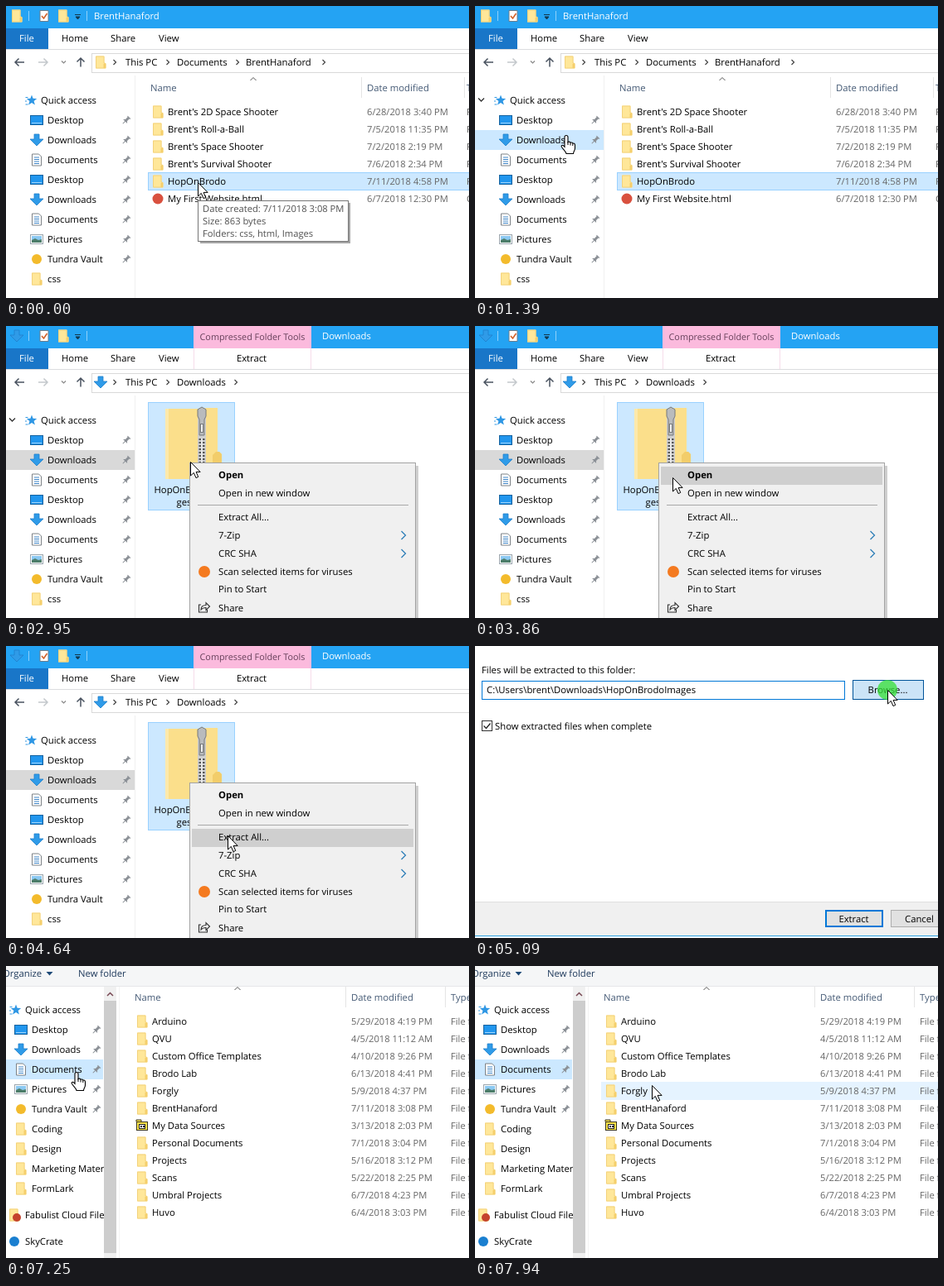
These frames come from a looping animation (558x353 px, 8000 ms). An HTML page:

```html
<!DOCTYPE html>
<html lang="en">
<head>
<meta charset="utf-8">
<title>Extracting a zip file</title>
<style>
  html, body { margin: 0; width: 100%; height: 100%; overflow: hidden; background: #fff; }
  svg { display: block; }
  text { font: 11.3px "Open Sans", "Noto Sans", sans-serif; fill: #000; text-rendering: geometricPrecision; white-space: pre; }
  .dim { fill: #656565; font-size: 11.2px; }
  .tip { fill: #505050; font-size: 11.2px; }
  .white { fill: #fff; }
  .head { fill: #455a75; }
  .tool { fill: #1e395b; }
  .tab { fill: #66405a; font-size: 10.8px; text-anchor: middle; }
  .mid { text-anchor: middle; }
  .bold { font-weight: 700; }
</style>
</head>
<body>
<svg id="stage" width="558" height="353" viewBox="0 0 558 353"></svg>
<script>
const LOOP = 8000;
const BLUE = '#24a3f3', SELECT = '#cce8ff', HOVER = '#e5f3ff', EDGE = '#99d1ff';

// Drawing helpers
const rect = (x, y, w, h, fill, stroke, sw = 1) => stroke
  ? `<rect x="${x + sw / 2}" y="${y + sw / 2}" width="${w - sw}" height="${h - sw}" fill="${fill}" stroke="${stroke}" stroke-width="${sw}"/>`
  : `<rect x="${x}" y="${y}" width="${w}" height="${h}" fill="${fill}"/>`;
const text = (x, y, s, cls = '') => `<text x="${x}" y="${y}" class="${cls}">${s}</text>`;
const path = (d, fill, stroke = 'none', sw = 1) =>
  `<path d="${d}" fill="${fill}" stroke="${stroke}" stroke-width="${sw}"/>`;
const at = (x, y, body) => `<g transform="translate(${x} ${y})">${body}</g>`;
const group = (id, body) => `<g id="${id}">${body}</g>`;
const bar = (id, fill = HOVER) => `<rect id="${id}" fill="${fill}"/>`;
const dot = (r, fill) => `<circle r="${r}" fill="${fill}"/>`;
const chevron = (x, y) => path(`M${x - 1.5} ${y - 3}l3 3-3 3`, 'none', '#444', 1.2);
const sortMark = (x, y) => path(`M${x - 3.5} ${y + 2}l3.5-3.5 3.5 3.5`, 'none', '#555');

// Icons, centred on 0,0
const folder = path('M-6-7.5h10.5v8l2 1v6h-12.5z', '#ffe799') +
  path('M-5.500-7h9.500v8l2 .5v5.500h-11.500z', 'none', '#f3d27c') + path('M3.500 7v-5l2.500-.5v5.500z', '#f5cf6c');
const icon = {
  folder,
  arrow: path('M-3-7h6v6h5l-8 8-8-8h5z', '#2f9be8', '#1f7fcb', .8),
  desktop: rect(-8, -6, 16, 12, '#2196ee', '#14629f') + rect(-6, 3, 12, 1, '#9fd4fa'),
  doc: path('M-5.5-7h8l3 3v11h-11z', '#fff', '#7d8286') + path('M-3-3h6M-3-.5h6M-3 2h6M-3 4.5h6', 'none', '#3f86c8'),
  pic: rect(-8, -6, 16, 12, '#fff', '#9aa5ad') + rect(-6, -4, 12, 8, '#8cc9f2') + path('M-6 4v-3l4-2 4 2 4-1v4z', '#4c7d6a'),
  star: path('M1-6.500l1.600 4.300 4.600.2-3.600 2.900 1.300 4.600-3.900-2.500-3.900 2.500 1.300-4.600-3.600-2.900 4.600-.2z', '#2f97e4') +
    path('M-6.500-3.500h3M-7 1h2M-6.500 5h3', 'none', '#2f97e4'),
  drive: dot(6, '#f3bb2c'),
  browser: dot(6.5, '#d9513f'),
  cloud: dot(6, '#1a7fd0'),
  art: folder + `<circle cx="3" cy="3" r="5" fill="#c4422c"/>`,
  source: rect(-7, -5, 14, 11, '#f7e24a', '#3a3620') + path('M-7-5v-2h6v2', '#f7e24a', '#3a3620') +
    rect(-4, -2, 8, 6, '#fff', '#222') + rect(-2, 0, 2, 2, '#222') + rect(1, 0, 2, 2, '#222'),
  pin: `<g transform="rotate(45)">${path('M-2.5-5h5v1h-1v4l2 2h-7l2-2v-4h-1zM-.5 2h1v4h-1z', '#8b9096')}</g>`
};
const put = (name, x, y) => at(x, y, icon[name]);

const navItems = (items, x, y, pinX) => items.map(([kind, label, pinned], i) =>
  put(kind, x, y + 24 * i) + text(x + 13, y + 4 + 24 * i, label) +
  (pinned ? put('pin', pinX, y + 24 * i) : '')).join('');

const fileRows = (rows, x, y, dateX, typeX) => rows.map(([name, date, kind = 'folder'], i) => {
  const cy = y + 21 * i;
  return (kind === 'source' ? group('sourceIcon', put(kind, x, cy)) : put(kind, x, cy)) +
    text(x + 12, cy + 4, name) + text(dateX, cy + 4, date, 'dim') +
    text(typeX, cy + 4, kind === 'browser' ? 'Code file' : 'File folder', 'dim');
}).join('');

const places = [
  ['desktop', 'Desktop', 1], ['arrow', 'Downloads', 1], ['doc', 'Documents', 1]
];
const extras = [['pic', 'Pictures', 1], ['drive', 'Tundra Vault', 1]];

// Explorer window
const frame =
  rect(0, 0, 558, 27, BLUE) + rect(27, 6, 1, 12, '#8fd0fa') +
  at(46, 12, path('M-5-6.5h10v13h-10z', '#fff', '#6d7d8a') + path('M-3 0l2.5 3 4-6', 'none', '#d2622a', 1.6)) +
  put('folder', 69, 12) + path('M83 10.500h7M84 13h5l-2.500 3z', '#12384f', '#12384f') +
  rect(97, 6, 1, 12, '#8fd0fa') +
  rect(0, 27, 51, 25, '#1976c8') + text(16, 43, 'File', 'white') +
  text(67, 43, 'Home') + text(126, 43, 'Share') + text(184, 43, 'View') +
  rect(0, 52, 558, 1, '#dcdddf') +
  path('M22 68H11M15.500 63.500L11 68l4.500 4.500', 'none', '#4a5360', 1.5) +
  path('M39 68h11M45.500 63.500L50 68l-4.500 4.500', 'none', '#c4c8cc', 1.5) +
  path('M67 66.500l2.500 2.500 2.500-2.500', 'none', '#888', 1.2) +
  path('M90 73.500V63M85.500 67.500L90 63l4.500 4.500', 'none', '#4a5360', 1.5) +
  rect(103, 57, 470, 24, '#fff', '#d9d9d9') + chevron(131, 68) + text(144, 72, 'This PC') + chevron(195, 68) +
  rect(155, 84, 1, 269, '#f0f0f0');

const nav = bar('navHover') + `<rect id="navSel" x="0" y="150" width="155" height="24"/>` +
  `<path id="twist" d="M4 111.500l3.500 3.500 3.500-3.500" fill="none" stroke="#333" stroke-width="1.300"/>` +
  put('star', 30, 114) + text(42, 118, 'Quick access') +
  navItems([...places, ...places, ...extras, ['folder', 'css']], 37, 138, 145);

const home = put('folder', 13, 12) + text(106, 16, 'BrentHanaford', 'white') +
  put('folder', 114, 68) + text(206, 72, 'Documents') + chevron(279, 68) +
  text(289, 72, 'BrentHanaford') + chevron(383, 68) +
  sortMark(298, 88) + text(174, 103, 'Name', 'head') + text(435, 103, 'Date modified', 'head') + text(555, 103, 'Type', 'head') +
  rect(428, 86, 1, 25, '#e5e5e5') + rect(552, 86, 1, 25, '#e5e5e5') +
  bar('rowHover') + rect(171, 201, 400, 22, SELECT, EDGE) +
  fileRows([
    ["Brent's 2D Space Shooter", '6/28/2018 3:40 PM'], ["Brent's Roll-a-Ball", '7/5/2018 11:35 PM'],
    ["Brent's Space Shooter", '7/2/2018 2:19 PM'], ["Brent's Survival Shooter", '7/6/2018 2:34 PM'],
    ['HopOnBrodo', '7/11/2018 4:58 PM'], ['My First Website.html', '6/7/2018 12:30 PM', 'browser']
  ], 183, 128, 435, 555);

const tip = rect(234, 238, 181, 49, '#00000059') + rect(231, 235, 182, 50, '#fff', '#767676') +
  ['Date created: 7/11/2018 3:08 PM', 'Size: 863 bytes', 'Folders: css, html, Images']
    .map((s, i) => text(237, 249 + 15 * i, s, 'tip')).join('');

const zip = path('M192 100h46l3-1h14v53h2l3 3v30h-68z', '#fbdf8b') + path('M192 100h4v85h-4z', '#fde9ab') +
  path('M249 156l4-4h4l3 3v30h-11z', '#f2cd6a') +
  rect(231, 104, 10, 81, '#cfcfcf') +
  `<path d="M236 136v49" stroke="#555" stroke-width="7" stroke-dasharray="2 2"/>` +
  `<path d="M236 136v49" stroke="#e8e8e8" stroke-width="2"/>` +
  path('M231 101l5-3 5 3v8l-2 4v19h-6v-19l-2-4z', '#b9bbbd', '#77797b') + rect(234, 118, 4, 11, '#f1f1f1', '#77797b');

const downloads = put('arrow', 13, 12) + put('arrow', 114, 68) + text(206, 72, 'Downloads') + chevron(277, 68) +
  group('plainTitle', text(106, 16, 'Downloads', 'white')) +
  group('toolTab', rect(226, 0, 142, 27, '#fbbadd') + rect(226, 27, 1, 25, '#f6dcea') + rect(367, 27, 1, 25, '#f6dcea') +
    text(297, 17, 'Compressed Folder Tools', 'tab') +
    text(296, 43, 'Extract', 'mid') + text(381, 16, 'Downloads', 'white')) +
  `<rect id="zipBack" x="171.500" y="92.500" width="104" height="130"/>` + zip +
  text(223.5, 202, 'HopOnBrodoIma', 'mid') + text(223.5, 217, 'ges.zip', 'mid');

const menu = rect(225, 169, 272, 200, '#00000030') + rect(221, 165, 273, 200, '#f0f0f0', '#a3a3a3') + bar('menuHover', '#cfcfcf') +
  text(256, 184, 'Open', 'bold') + rect(231, 216, 254, 1, '#a8a8a8') +
  [['Open in new window', 206], ['Extract All...', 235], ['7-Zip', 257], ['CRC SHA', 279],
   ['Scan selected items for viruses', 301], ['Pin to Start', 322], ['Share', 345]]
    .map(([s, y]) => text(256, y, s)).join('') +
  [253, 275].map(y => path(`M476.500 ${y - 5}l5 5-5 5`, 'none', '#2f7fb8', 1.3)).join('') +
  at(239, 297, dot(7, '#f47a20')) +
  path('M235 337h-2.500v9h10v-3M235 343c0-4 3-5.500 6-5.500v-3l4.500 4.500-4.500 4.500v-3c-3 0-4.500.500-6 2.500z', 'none', '#333', 1.1);

// Extraction wizard
const wizard = rect(0, 0, 558, 353, '#fff') + text(8, 33, 'Files will be extracted to this folder:') +
  rect(8, 42, 438, 23, '#fff', '#0078d7') + text(14, 57, 'C:\\Users\\brent\\Downloads\\HopOnBrodoImages') +
  `<rect id="browse" x="455.500" y="41.500" width="85" height="23"/>` + text(497.5, 57, 'Browse...', 'mid') +
  rect(8, 90, 13, 13, '#fff', '#333') + path('M10.500 96.500l3 3 5-6', 'none', '#222', 1.3) +
  text(24, 101, 'Show extracted files when complete') +
  rect(0, 309, 558, 41, '#f0f0f0') + rect(0, 309, 558, 1, '#dfdfdf') +
  rect(422, 319, 70, 21, '#e1e1e1', '#0078d7', 2) + text(456.5, 334, 'Extract', 'mid') +
  rect(501, 319, 70, 21, '#e1e1e1', '#adadad') + text(518, 334, 'Cancel') +
  rect(0, 350, 558, 1, '#2a9fe0');

// Folder picker
const picker = rect(0, 0, 558, 353, '#fff') + bar('pickHover') +
  group('docSel', rect(0, 113, 117, 24, SELECT)) +
  put('star', 11, 53) + text(23, 57, 'Quick access') +
  navItems([...places, ...extras, ...['Coding', 'Design', 'Marketing Materials', 'FormLark'].map(s => ['folder', s])], 18, 77, 109) +
  put('art', 10, 301) + text(23, 305, 'Fabulist Cloud Files') + put('cloud', 10, 333) + text(23, 337, 'SkyCrate') +
  rect(118, 25, 440, 328, '#fff') + rect(118, 25, 15, 328, '#f0f0f0') + rect(118, 42, 15, 305, '#cdcdcd') +
  path('M122 36l3.500-3.500 3.500 3.500', 'none', '#7a4a55', 1.5) + rect(136, 25, 1, 328, '#f3f3f3') +
  rect(0, 0, 558, 24, '#f5f6f7') + rect(0, 24, 558, 1, '#e6e7e9') +
  text(-4, 13, 'Organize', 'tool') + text(87, 13, 'New folder', 'tool') + path('M48.500 7h8l-4 4.500z', '#1e4a78') +
  group('empty', text(454, 52, 'No items match your search.', 'dim')) +
  group('docs', sortMark(279, 27) + text(155, 42, 'Name', 'head') + text(416, 42, 'Date modified', 'head') + text(536, 42, 'Type', 'head') +
    rect(409, 25, 1, 25, '#e5e5e5') + rect(529, 25, 1, 25, '#e5e5e5') + bar('docHover') +
    fileRows([
      ['Arduino', '5/29/2018 4:19 PM'], ['QVU', '4/5/2018 11:12 AM'], ['Custom Office Templates', '4/10/2018 9:26 PM'],
      ['Brodo Lab', '6/13/2018 4:41 PM'], ['Forgly', '5/9/2018 4:37 PM'], ['BrentHanaford', '7/11/2018 3:08 PM'],
      ['My Data Sources', '3/13/2018 2:03 PM', 'source'], ['Personal Documents', '7/1/2018 3:04 PM'],
      ['Projects', '5/16/2018 3:12 PM'], ['Scans', '5/22/2018 2:25 PM'], ['Umbral Projects', '6/7/2018 4:23 PM'],
      ['Huvo', '6/4/2018 3:03 PM']
    ], 164, 67, 416, 536));

const pointer = `<circle id="click" r="12" fill="#35e035" opacity=".75"/>` +
  group('arrowCur', path('M.5.500v16.500l3.800-3.600 2.700 6.200 2.700-1.200-2.600-6h5z', '#fff', '#000')) +
  group('handCur', path('M1 .5c1.500 0 2 1 2 2v6c1-.8 2.500-.5 3 .8 1-.6 2.400-.3 2.800.9 1.200-.5 2.700.2 2.700 1.800v4c0 3-2 4-2 6.500h-8.500c0-2-3-4.500-5.500-8-1.200-1.800.8-3 2.200-1.700l1.300 1.500v-11.800c0-1 .5-2 2-2z', '#fff', '#000', 1.1) +
    path('M3 8v4M6 9.500v3M8.800 10.500v2.500', 'none', '#000'));

const stage = document.getElementById('stage');
stage.innerHTML = group('explorer', frame + nav + group('home', home + group('tip', tip)) + group('downloads', downloads) + group('menu', menu)) +
  group('wizard', wizard) + group('picker', picker) + group('pointer', pointer);
const el = {};
stage.querySelectorAll('[id]').forEach(e => el[e.id] = e);

// Pointer moves: start, end, steps, target
const moves = [
  [460, 1070, 9, 109, 156], [1870, 2330, 7, 222, 164], [3640, 3860, 4, 238, 183],
  [3935, 4410, 7, 267, 229], [4790, 5090, 5, 497, 53], [5560, 5561, 2, 402, 384],
  [6190, 6640, 7, 70, 126], [7250, 7940, 10, 213, 144]
];
const clicks = [[1320, 1390], [2710, 2790], [4480, 4640], [5020, 5160], [6700, 6860]];

function pointerAt(t) {
  let x = 231, y = 213;
  for (const [start, end, n, tx, ty] of moves) {
    if (t < start) break;
    const k = Math.min(1, (Math.floor((t - start) / (end - start) * (n - 1) + .01) + 1) / n);
    x += (tx - x) * k;
    y += (ty - y) * k;
  }
  return [x, y];
}

const show = (id, on) => { el[id].style.display = on ? '' : 'none'; };
const within = (t, a, b) => t >= a && t < b;

function placeBar(id, on, x, y, width, height) {
  show(id, on);
  if (on) Object.entries({ x, y, width, height }).forEach(([k, v]) => el[id].setAttribute(k, v));
}

function rowBar(id, on, py, top, step, count, x, w, h) {
  const i = Math.floor((py - top) / step);
  placeBar(id, on && i >= 0 && i < count, x, top + step * i, w, h);
}

function render(t) {
  const [x, y] = pointerAt(t);
  const inExplorer = t < 4790, inPicker = t >= 5330, picked = t >= 2710, listed = t >= 6865;
  show('explorer', inExplorer);
  show('home', t < 1490);
  show('downloads', t >= 1490);
  show('tip', t < 460);
  show('wizard', within(t, 4790, 5330));
  show('picker', inPicker);

  rowBar('navHover', x < 155, y, 126, 24, 9, 0, 155, 24);
  show('navSel', t >= 1320);
  el.navSel.setAttribute('fill', picked ? '#d9d9d9' : SELECT);
  el.twist.style.opacity = t < 3000
    ? Math.min(1, Math.max(0, Math.floor((t - 690) / 76) / 4))
    : t < 3170 ? 1 : t < 3330 ? .75 : t < 3480 ? .5 : t < 3640 ? .25 : 0;
  rowBar('rowHover', x > 171, y, 117, 21, 6, 171, 387, 22);

  show('plainTitle', !picked);
  show('toolTab', picked);
  el.zipBack.setAttribute('fill', picked ? SELECT : x > 171 ? HOVER : 'none');
  el.zipBack.setAttribute('stroke', picked ? EDGE : 'none');
  show('menu', t >= 2790);
  el.menu.style.opacity = t < 2860 ? .35 : t < 2940 ? .7 : 1;
  const tops = [170, 192, 221, 243];
  placeBar('menuHover', t >= 3640 && y >= 170, 224, tops.filter(v => v <= y).pop(), 267, 22);

  const onBrowse = x > 455 && y < 65;
  el.browse.setAttribute('fill', onBrowse ? '#cce4f7' : '#e1e1e1');
  el.browse.setAttribute('stroke', onBrowse ? '#005499' : '#adadad');

  rowBar('pickHover', x < 118, y, 65, 24, 9, 0, 117, 24);
  show('docSel', t >= 6715);
  show('empty', !listed);
  show('docs', listed);
  show('sourceIcon', t >= 7020);
  rowBar('docHover', x > 152, y, 56, 21, 12, 152, 406, 22);

  const hand = inExplorer ? x < 155 : inPicker && x < 118;
  show('handCur', hand);
  show('arrowCur', !hand);
  show('click', clicks.some(([a, b]) => within(t, a, b)));
  show('pointer', !within(t, 5330, 6190));
  el.pointer.setAttribute('transform', `translate(${Math.round(x)} ${Math.round(y)})`);
}

const begin = performance.now();
function tick() {
  render((performance.now() - begin) % LOOP);
  requestAnimationFrame(tick);
}
tick();
</script>
</body>
</html>
```
